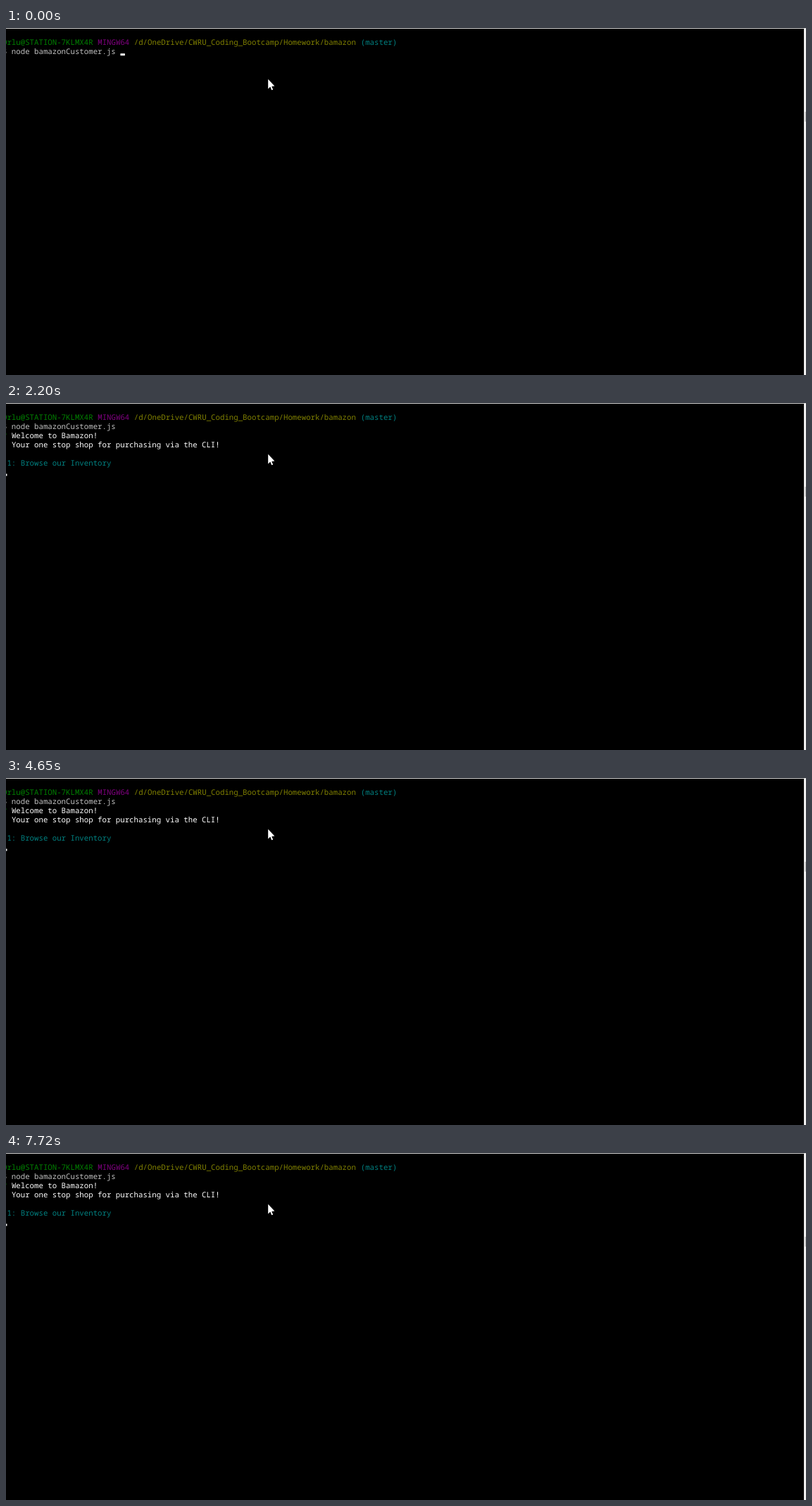
An HTML page with a canvas that plays this animation: 1136 by 493 pixels, repeating every 8 s.

```html
<!DOCTYPE html>
<html lang="en">
<head>
<meta charset="utf-8">
<title>Terminal session</title>
<style>
  html, body { margin: 0; width: 100%; height: 100%; overflow: hidden; background: #000; }
  canvas { display: block; }
</style>
</head>
<body>
<canvas id="stage" width="1136" height="493"></canvas>
<script>
const ctx = document.getElementById('stage').getContext('2d', { alpha: false });
const LOOP = 8000;
const CELL = 6.44, LINE = 12.88, LEFT = -5, BASELINE = 24.2;
const GREEN = '#008000', PURPLE = '#800080', OLIVE = '#808000', TEAL = '#008080';
const SILVER = '#c0c0c0', WHITE = '#fff';

// Start time and row of the text cursor; null means hidden.
const CURSOR = [
  [0, 1], [420, null], [700, 2], [970, null], [1090, 3], [1240, null],
  [2200, 6], [3020, null], [3570, 6], [4100, null], [4650, 6], [5090, null],
  [5620, 6], [6170, null], [6730, 6], [7280, null], [7720, 6]
];

function rect(x, y, w, h, color) {
  ctx.fillStyle = color;
  ctx.fillRect(x, y, w, h);
}

function print(row, col, text, color) {
  ctx.fillStyle = color;
  ctx.fillText(text, LEFT + col * CELL, Math.round(BASELINE + row * LINE));
}

function drawWindow() {
  rect(0, 0, 1136, 493, '#000');
  rect(0, 0, 1136, 1, '#d0d0d0');
  rect(1133, 1, 3, 492, '#f0f0f0');
  rect(1134, 119, 2, 14, '#cdcdcd');
}

function drawPrompt() {
  print(0, 0, 'Orlu@STATION-7KLMX4R', GREEN);
  print(0, 21, 'MINGW64', PURPLE);
  print(0, 29, '/d/OneDrive/CWRU_Coding_Bootcamp/Homework/bamazon', OLIVE);
  print(0, 79, '(master)', TEAL);
  print(1, 0, '$ node bamazonCustomer.js', SILVER);
}

function drawMenu(chosen) {
  print(2, 0, '?', GREEN);
  print(2, 2, 'Welcome to Bamazon!', WHITE);
  print(3, 2, 'Your one stop shop for purchasing via the CLI!', WHITE);
  if (chosen) {
    print(5, 1, '1: Browse our Inventory', TEAL);
    return;
  }
  print(5, 1, '(Use arrow keys)', SILVER);
  print(6, 0, '>', TEAL);
  print(6, 2, '1: Browse our Inventory', TEAL);
  print(7, 2, '2: End Session', SILVER);
}

function drawCursor(time) {
  const row = CURSOR.filter(([start]) => start <= time).pop()[1];
  if (row === null) return;
  const col = row === 1 ? 26 : 0;
  rect(LEFT + col * CELL, 36.2 + (row - 1) * LINE, CELL, 3, WHITE);
}

function drawPointer() {
  const points = [[0, 0], [0, 13.6], [3.1, 10.8], [5, 15.4], [7, 14.6], [5.1, 10.1], [9.2, 9.6]];
  ctx.fillStyle = WHITE;
  ctx.beginPath();
  points.forEach(([x, y]) => ctx.lineTo(372.2 + x, 72.8 + y));
  ctx.fill();
}

function draw(time) {
  ctx.font = `${CELL / 0.6}px "Noto Sans Mono", "DejaVu Sans Mono", monospace`;
  ctx.textRendering = 'geometricPrecision';
  drawWindow();
  drawPrompt();
  if (time >= 1240) drawMenu(time >= 2200);
  drawCursor(time);
  drawPointer();
}

const begin = performance.now();
function tick() {
  draw((performance.now() - begin) % LOOP);
  requestAnimationFrame(tick);
}
tick();
</script>
</body>
</html>
```
